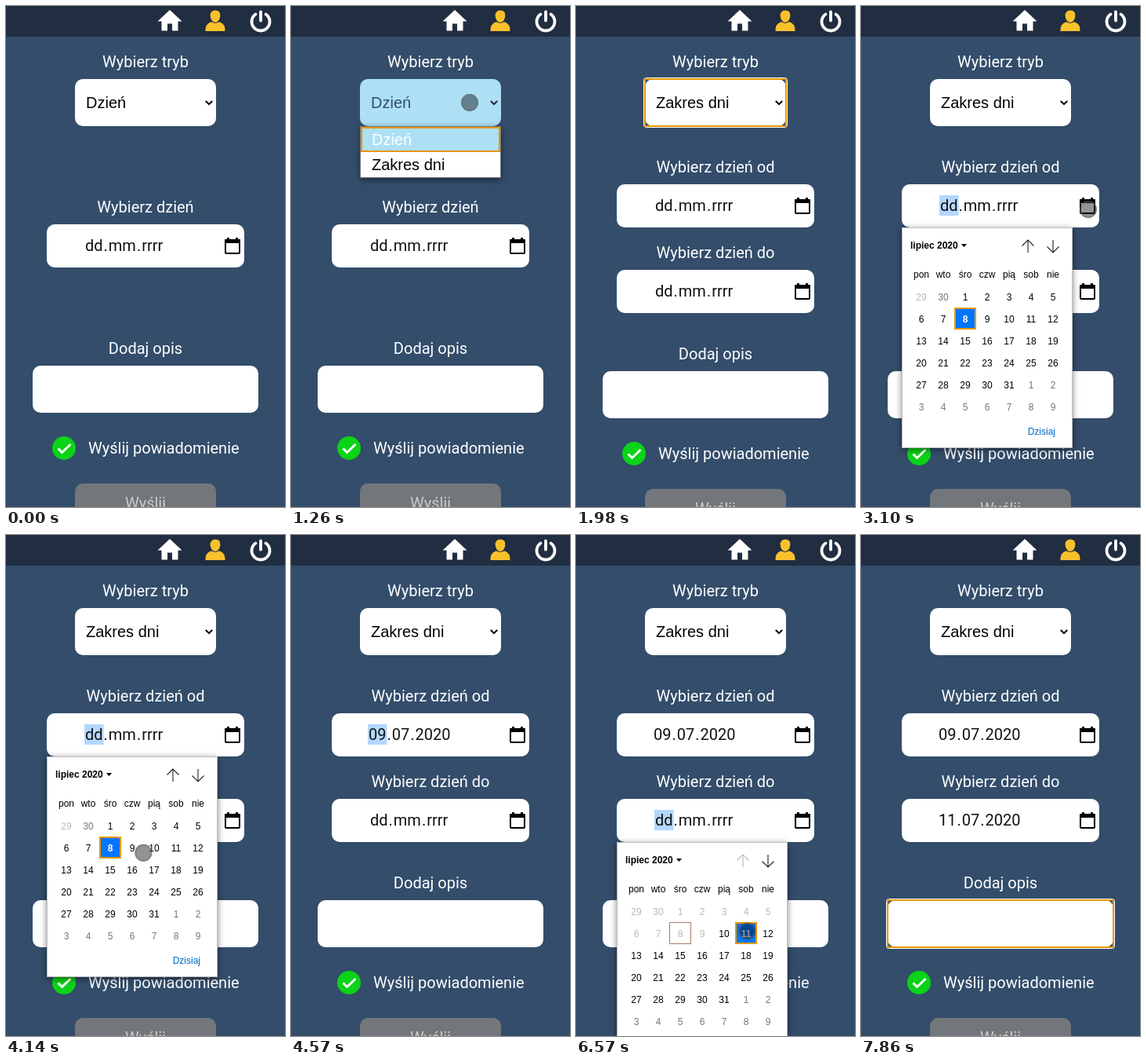
An HTML page with a canvas for the animation above (8 s loop, 356 by 638 pixels).

```html
<!DOCTYPE html>
<html lang="pl">
<head>
<meta charset="utf-8">
<style>
  html, body { margin: 0; height: 100%; overflow: hidden; background: #334d6b; }
  canvas { display: block; }
</style>
</head>
<body>
<canvas width="356" height="638"></canvas>
<script>
const ctx = document.querySelector('canvas').getContext('2d');
const LOOP = 8000;
const ROBOTO = '20px Roboto, sans-serif';
const ARIAL = '20px "Liberation Sans", Arial, sans-serif';
const SMALL = '12px "Liberation Sans", Arial, sans-serif';
const SKY = '#ade0f5', ORANGE = '#e59700', BLUE = '#0075ff', SELECTION = '#b3d7ff';

function text(str, x, y, font = ROBOTO, color = '#fff', align = 'center') {
  ctx.font = font;
  ctx.fillStyle = color;
  ctx.textAlign = align;
  ctx.fillText(str, x, y);
}

function box(x, y, w, h, color, r = 0) {
  ctx.fillStyle = color;
  ctx.beginPath();
  ctx.roundRect(x, y, w, h, r);
  ctx.fill();
}

function frame(x, y, w, h, color, width = 1, r = 0) {
  ctx.strokeStyle = color;
  ctx.lineWidth = width;
  ctx.beginPath();
  ctx.roundRect(x, y, w, h, r);
  ctx.stroke();
}

function path(d, { fill, stroke, width = 1 }) {
  const shape = new Path2D(d);
  if (fill) { ctx.fillStyle = fill; ctx.fill(shape); }
  if (stroke) { ctx.strokeStyle = stroke; ctx.lineWidth = width; ctx.stroke(shape); }
}

function shadowed(draw) {
  ctx.save();
  ctx.shadowColor = 'rgba(0,0,0,.5)';
  ctx.shadowBlur = 8;
  ctx.shadowOffsetY = 2;
  draw();
  ctx.restore();
}

function focusRing(x, y, w, h) {
  frame(x - 1.5, y - 1.5, w + 3, h + 3, '#fff', 1, 3);
  frame(x, y, w, h, ORANGE, 2, 2);
}

function dot(x, y, r = 11) {
  ctx.fillStyle = 'rgba(0,0,0,.42)';
  ctx.strokeStyle = 'rgba(110,110,110,.5)';
  ctx.lineWidth = 2;
  ctx.beginPath();
  ctx.arc(x, y, r, 0, 7);
  ctx.fill();
  ctx.beginPath();
  ctx.arc(x, y, r - 1, 0, 7);
  ctx.stroke();
}

// Moves the touch dot in 11 discrete steps and holds it at the end.
function glide(t, start, x0, y0, x1, y1) {
  const p = Math.min(1, Math.floor((t - start) / 71) / 10);
  const e = p * p * (3 - 2 * p);
  dot(x0 + (x1 - x0) * e, y0 + (y1 - y0) * e);
}

function header() {
  box(0, 0, 356, 39, '#212d40');
  path('M209 5L224.5 19.5H219.5V31.5H212V22.5H206V31.5H198.5V19.5H193.5Z', { fill: '#fff' });
  path('M254.5 32Q254 23 261 20.5L273 20.5Q280 23 279.500 32Z', { fill: '#f8c12c' });
  path('M267 5C271.500 5 274 8 274 12C274 17 271 21.500 267 21.500S260 17 260 12C260 8 262.500 5 267 5Z',
    { fill: '#f8c12c', stroke: '#212d40', width: 1.2 });
  ctx.lineCap = 'round';
  path('M318.500 10.500A11.500 11.500 0 1 0 331.500 10.500M325 7.500V18.500', { stroke: '#fff', width: 3.8 });
  ctx.lineCap = 'butt';
}

function dateField(y, parts, selected) {
  box(52, y, 252, 55, '#fff', 10);
  let x = parts[0] === 'dd' ? 100 : 98;
  ctx.font = ROBOTO;
  parts.forEach((part, i) => {
    const w = ctx.measureText(part).width + 2;
    if (selected && i === 0) box(x, y + 14, w, 26, SELECTION);
    text(part, x + 1, y + 34, ROBOTO, '#111', 'left');
    x += w;
    if (i < 2) {
      text('.', x, y + 34, ROBOTO, '#111', 'left');
      x += ctx.measureText('.').width;
    }
  });
  frame(280, y + 20, 18, 17, '#000', 2, 1);
  box(279, y + 19, 20, 5, '#000', 1);
  box(282, y + 17, 3, 3, '#000');
  box(293, y + 17, 3, 3, '#000');
}

function modeSelect(value, hovered, focused) {
  box(88, 93, 180, 60, hovered ? SKY : '#fff', 10);
  if (focused) focusRing(88, 93, 180, 60);
  const ink = hovered ? '#334d6b' : '#000';
  text(value, 102, 130, ARIAL, ink, 'left');
  path('M254.800 121L259 125.200L263.200 121', { stroke: hovered ? '#223' : '#000', width: 2 });
}

function optionList(active) {
  shadowed(() => box(88.5, 153, 179, 65.5, '#fff'));
  frame(88.5, 153.5, 179, 65, '#777');
  const y = 154 + active * 32;
  box(89, y, 178, 32, SKY);
  frame(90, y + 1, 176, 30, ORANGE, 2);
  ['Dzień', 'Zakres dni'].forEach((name, i) =>
    text(name, 103, 177 + i * 32, ARIAL, i === active ? '#fff' : '#000', 'left'));
}

// firstEnabled: earliest selectable July day, 0 when there is no limit.
function calendar(top, chosen, firstEnabled) {
  shadowed(() => box(52, top, 218, 280.5, '#fff'));
  frame(52.5, top + .5, 217, 280, '#bfbfbf');
  text('lipiec 2020', 63, top + 27, 'bold ' + SMALL, '#000', 'left');
  path(`M128 ${top + 21}h7l-3.500 4z`, { fill: '#000' });
  const arrow = `v16m-7.500 -8.500l7.500 -7.500l7.500 7.500`;
  path(`M213 ${top + 16}${arrow}`, { stroke: firstEnabled ? '#bbb' : '#222', width: 1.1 });
  path(`M245 ${top + 16}v16m-7.500 -7.500l7.500 7.500l7.500 -7.500`, { stroke: '#222', width: 1.1 });

  ['pon', 'wto', 'śro', 'czw', 'pią', 'sob', 'nie'].forEach((name, i) =>
    text(name, 77 + i * 28, top + 64, SMALL, '#000'));

  for (let i = 0; i < 42; i++) {
    const day = i - 1;
    const label = day < 1 ? day + 30 : day > 31 ? day - 31 : day;
    const x = 77 + (i % 7) * 28, y = top + 93 + Math.floor(i / 7) * 28;
    let color = day < 1 || day > 31 ? '#757575' : '#000';
    if (day < firstEnabled) color = '#b9b9b4';
    if (day === 8) frame(x - 13.5, y - 18.5, 27, 27, '#a5786c');
    if (day === chosen) {
      box(x - 14, y - 19, 28, 28, ORANGE);
      box(x - 12, y - 17, 24, 24, BLUE);
      color = '#fff';
    }
    text(label, x, y, (day === chosen ? 'bold ' : '') + SMALL, color);
  }
  text('Dzisiaj', 248, top + 264, SMALL, '#0068c9', 'right');
}

function render(t) {
  const within = (a, b) => t >= a && t < b;
  const range = t >= 1920;
  const shift = range ? 7 : 0;
  const blank = ['dd', 'mm', 'rrrr'];

  box(0, 0, 356, 638, '#334d6b');
  header();

  text('Wybierz tryb', 178, 78);
  modeSelect(range ? 'Zakres dni' : 'Dzień', within(1260, 1980), within(1980, 3100));

  if (range) {
    text('Wybierz dzień od', 178, 212);
    dateField(227, t < 4450 ? blank : ['09', '07', '2020'], within(3100, 5270));
    text('Wybierz dzień do', 178, 321);
    dateField(336, t < 6690 ? blank : ['11', '07', '2020'], within(5270, 7320));
  } else {
    text('Wybierz dzień', 178, 263);
    dateField(278, blank);
  }

  text('Dodaj opis', 178, 443 + shift);
  box(34, 458 + shift, 288, 60, '#fff', 10);
  if (t >= 7320) focusRing(34, 465, 288, 60);
  if (within(7320, 7860)) box(178, 480, 1, 30, '#000');

  ctx.fillStyle = '#0bd317';
  ctx.beginPath();
  ctx.arc(74, 563 + shift, 15, 0, 7);
  ctx.fill();
  path(`M66.500 ${563.5 + shift}l5 5l11 -10.500`, { stroke: '#fff', width: 3 });
  text('Wyślij powiadomienie', 105, 570 + shift, ROBOTO, '#fff', 'left');
  box(88, 608 + shift, 180, 60, '#73767a', 10);
  text('Wyślij', 178, 640 + shift, ROBOTO, '#c9cbcd');

  if (within(1260, 1920)) optionList(t < 1380 ? 0 : 1);
  if (within(3100, 4450)) calendar(282, t < 4330 ? 8 : 9, 0);
  if (within(5330, 6690)) calendar(391, t < 6500 ? 10 : 11, 9 + 1);

  if (within(1260, 1380)) dot(228, 123);
  if (within(1520, 1770)) dot(235, 195 + (t - 1520) / 250 * 17, 6);
  if (within(3100, 3480)) dot(290, 259);
  if (within(3480, 4570)) glide(t, 3480, 290, 259, 172, 409);
  if (within(5270, 5690)) dot(280, 366);
  if (within(5870, 6690)) glide(t, 5870, 269, 417, 217, 507);
}

function tick() {
  render(performance.now() % LOOP);
  requestAnimationFrame(tick);
}
tick();
</script>
</body>
</html>
```
